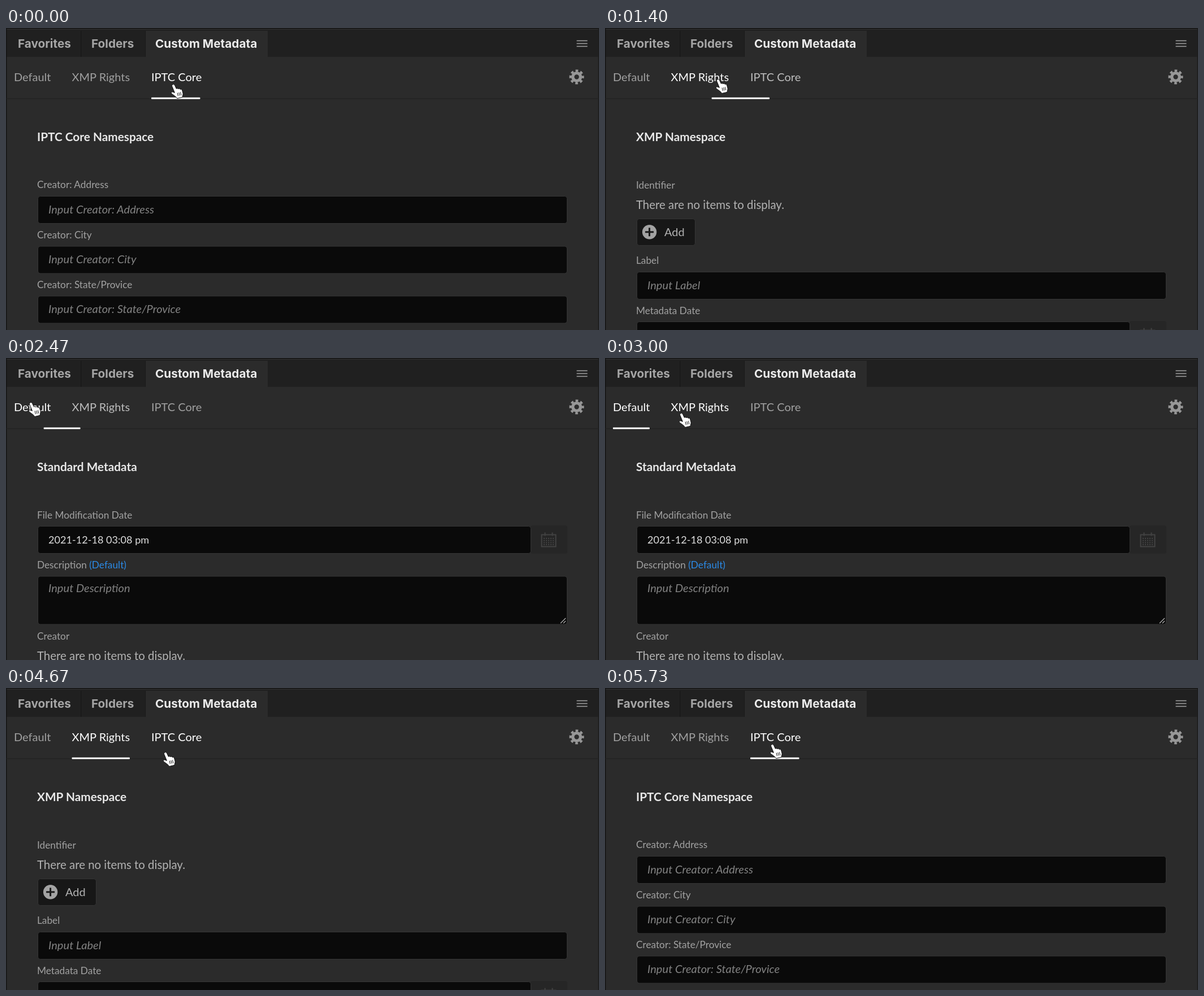
An HTML page for the animation above (6070 ms loop, 1049 by 534 pixels).

```html
<!DOCTYPE html>
<html lang="en">
<head>
<meta charset="utf-8">
<title>Custom Metadata panel</title>
<style>
html, body { margin: 0; width: 100%; height: 100%; overflow: hidden; background: #2b2b2b; }
svg { display: block; width: 100%; height: 100%; }
text { font: 20px Lato, sans-serif; fill: #b2b2b2; }
.panel { font: bold 20.75px Inter, sans-serif; fill: #a6a6a6; }
.head { font-weight: bold; font-size: 20.8px; fill: #e8e8e8; }
.label { font-size: 17.25px; fill: #a2a2a2; }
.hint { font-style: italic; font-size: 20.1px; fill: #828282; }
.note { font-size: 20.4px; }
.value { font-size: 18.1px; fill: #dedede; }
.box { fill: #0a0a0a; stroke: #353535; }
</style>
</head>
<body>
<svg id="stage" viewBox="0 0 1049 534"></svg>
<script>
const FPS = 15, LOOP = 6070;

const text = (cls, x, y, s) => `<text class="${cls}" x="${x}" y="${y}">${s}</text>`;
const rect = (x, y, w, h, attrs) => `<rect x="${x}" y="${y}" width="${w}" height="${h}" ${attrs}/>`;
const box = (y, h = 48, w = 936) => rect(56.5, y + .5, w, h, 'class="box" rx="4"');
const input = (y, name) => text('label', 55, y - 14, name) + box(y) + text('hint', 75, y + 30.5, 'Input ' + name);
const empty = y => text('note', 55, y, 'There are no items to display.');

function dateBox(y) {
  let dots = '';
  for (let r = 0; r < 4; r++)
    for (let c = 0; c < 5; c++) dots += `M${951 + c * 4} ${y + 22 + r * 3.7}h2`;
  return rect(928, y - 1, 65, 50, 'fill="#262626" rx="4"') + box(y, 48, 872) +
    `<path d="M947.5 ${y + 15.5}h25v21h-25zM953.5 ${y + 11.5}v6M966.5 ${y + 11.5}v6${dots}"
      fill="none" stroke="#424242" stroke-width="2"/>`;
}

const addButton = rect(56.5, 337.5, 103, 47, 'fill="#171717" stroke="#353535" rx="4"') +
  '<circle cx="78.6" cy="360.8" r="12.7" fill="#a3a3a3"/>' +
  '<path d="M71.1 360.8h15M78.6 353.3v15" stroke="#1a1a1a" stroke-width="3"/>' +
  text('', 105, 368, 'Add');

const pages = [
  text('head', 55, 200, 'Standard Metadata') +
    text('label', 55, 283.5, 'File Modification Date') + dateBox(297) +
    text('value', 75, 327.5, '2021-12-18 03:08 pm') +
    text('label', 55, 371.5, 'Description <tspan fill="#2b8ae6">(Default)</tspan>') +
    box(385.5, 85) + text('hint', 75, 413.5, 'Input Description') +
    '<path d="M981 469l9-9M986 469l4-4" stroke="#b0b0b0" stroke-width="1.3"/>' +
    text('label', 55, 497.5, 'Creator') + empty(533.5),
  text('head', 55, 200, 'XMP Namespace') +
    text('label', 55, 283.5, 'Identifier') + empty(319.5) + addButton +
    input(431, 'Label') + text('label', 55, 505.5, 'Metadata Date') + dateBox(519),
  text('head', 55, 200, 'IPTC Core Namespace') +
    input(297, 'Creator: Address') + input(385.5, 'Creator: City') + input(473.5, 'Creator: State/Provice')
];

// "lit" holds the frames at which a tab label alternately turns bright and dim
const tabs = [
  { name: 'Default', x: 14, w: 65, lit: [30, 56] },
  { name: 'XMP Rights', x: 116.5, w: 102.5, lit: [14, 36, 43, 83] },
  { name: 'IPTC Core', x: 257, w: 86.5, lit: [-9, 20, 65] }
];
const clicks = [[-9, 2], [20, 1], [36, 0], [56, 1], [83, 2]];

// frame, x, y, and 1 where the hand glides on without easing
const path = [
  [8, 291, 98], [16, 195, 89], [23, 195, 89], [29, 49, 73], [32, 39, 77], [39, 39, 77],
  [45, 130, 96], [59, 130, 96], [65, 254, 116], [70, 277, 112, 1], [75, 286, 106, 1], [80, 291, 98, 1]
];

stage.innerHTML =
  rect(0, 0, 1049, 534, 'fill="#2b2b2b"') +
  rect(0, 0, 1049, 51, 'fill="#202020"') +
  rect(0, 0, 1049, 1.5, 'fill="#121212"') + rect(0, 1.5, 1049, 1.5, 'fill="#2d2d2d"') +
  rect(247, 5, 216, 46, 'fill="#2b2b2b"') +
  rect(132, 5, 1.5, 46, 'fill="#191919"') + rect(246, 5, 1, 46, 'fill="#191919"') +
  rect(0, 0, 1.5, 534, 'fill="#151515"') + rect(1047.5, 0, 1.5, 534, 'fill="#1c1c1c"') +
  rect(1, 124, 1047, 2, 'fill="#242424"') +
  text('panel', 21, 34.5, 'Favorites') + text('panel', 151, 34.5, 'Folders') +
  text('panel', 264, 34.5, '<tspan fill="#ebebeb">Custom Metadata</tspan>') +
  '<path d="M1009.5 22.5h19M1009.5 27.5h19M1009.5 32.5h19" stroke="#a3a3a3" stroke-width="1.5"/>' +
  `<g fill="none" stroke="#979797" transform="translate(1009.5 86.5)">
    <circle r="6.9" stroke-width="5.4"/>
    <circle r="11" stroke-width="4" stroke-dasharray="4.6 4.039" stroke-dashoffset="2.3"/></g>` +
  tabs.map(t => text('tab', t.x, 94, t.name)).join('') +
  pages.map(p => `<g class="page">${p}</g>`).join('') +
  rect(0, 122.7, 0, 3, 'id="bar" fill="#fafafa" rx="1"') +
  `<g id="hand" stroke="#111" stroke-linejoin="round" stroke-linecap="round">
    <path fill="#fff" d="M3.6 2C5 .9 6.8 1.8 7.6 3.4L10.4 9.4C11.4 8.4 13 8.6 13.6 9.8 14.8 8.8 16.4 9.2 17 10.4
      18.4 9.8 20.2 10.4 20.6 12L22 17.2C22.4 20 21.2 22 21 24.4L11.8 26.6C10.2 23.8 6.2 21 3.2 19 .6 17.4 1.2 14.6
      3.8 15L7.4 16.4 2.8 5.2C2.3 3.9 2.7 2.7 3.6 2Z"/>
    <path fill="none" d="M12.2 17l1.1 4.8M14.9 16.4l1.1 4.8M17.6 15.8l1.1 4.8"/></g>`;

const labels = document.querySelectorAll('.tab');
const groups = document.querySelectorAll('.page');
const mix = (a, b, p) => a + (b - a) * p;
const smooth = p => (p = Math.min(1, Math.max(0, p)), p * p * (3 - 2 * p));

function brightness(lit, f) {
  return lit.reduce((v, at, i) => f < at ? v : mix(v, i % 2 ? 0 : 1, smooth((f - at + .7) / 2.7)), 0);
}

function handAt(f) {
  const i = path.findIndex(k => k[0] >= f);
  if (i < 1) return path[i < 0 ? path.length - 1 : 0].slice(1, 3);
  const [a, b] = [path[i - 1], path[i]];
  const p = (f - a[0]) / (b[0] - a[0]), e = b[3] ? p : smooth(p);
  return [mix(a[1], b[1], e), mix(a[2], b[2], e)];
}

function draw(now) {
  const f = Math.floor((now % LOOP + 4) * FPS / 1000);
  const n = clicks.filter(c => c[0] <= f).length - 1;
  const [at, page] = clicks[n];
  const to = tabs[page], from = tabs[clicks[Math.max(0, n - 1)][1]];

  groups.forEach((g, i) => g.style.display = i === page ? '' : 'none');
  labels.forEach((el, i) => {
    const c = Math.round(mix(160, 255, brightness(tabs[i].lit, f)));
    el.style.fill = `rgb(${c},${c},${c})`;
  });
  bar.setAttribute('x', mix(from.x, to.x, smooth((f - at + .93) / 3.93)));
  bar.setAttribute('width', to.w);
  hand.setAttribute('transform', `translate(${handAt(f)})`);
}

let start;
function tick(now) {
  start ??= now;
  draw(now - start);
  requestAnimationFrame(tick);
}
draw(0);
requestAnimationFrame(tick);
</script>
</body>
</html>
```
